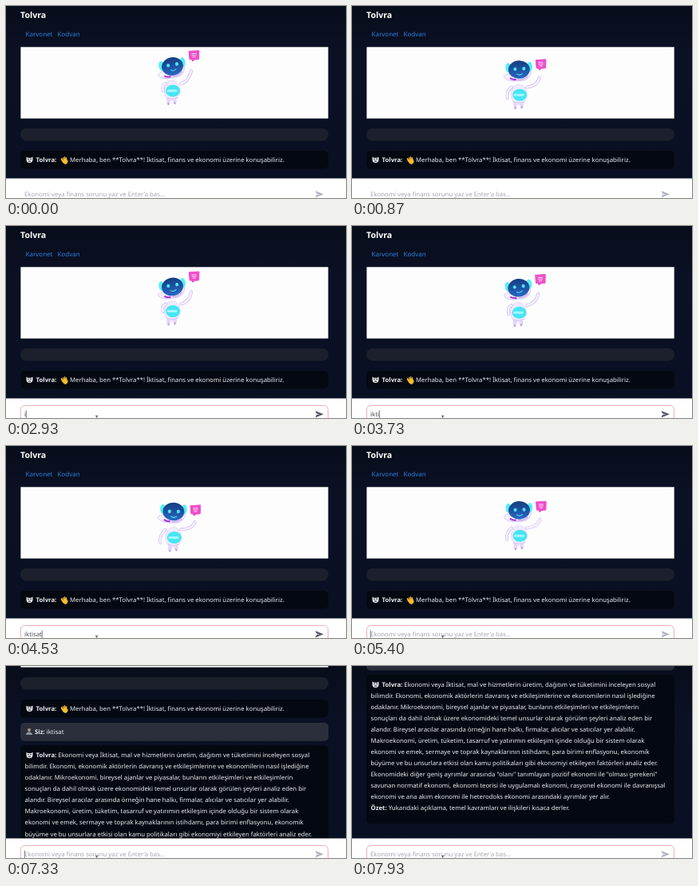
An HTML page that plays this animation: 426x240 px, repeating every 8 s.

```html
<!DOCTYPE html>
<html lang="tr">
<head>
<meta charset="utf-8">
<title>Tolvra</title>
<style>
  html, body { margin: 0; height: 100%; overflow: hidden; background: #0a1022; }
  svg { display: block; width: 100vw; height: 100vh; }
  text { font-family: "Noto Sans", "Open Sans", sans-serif; font-size: 7.78px; font-weight: 500; fill: #eceef2; text-rendering: geometricPrecision; white-space: pre; }
  .bold { font-weight: 700; }
  .title { font-size: 10.6px; font-weight: 700; fill: #fff; }
  .link { font-size: 8px; fill: #2b7de0; }
  .input { font-size: 7.8px; font-weight: 400; }
  .bubble { fill: #040911; }
</style>
</head>
<body>
<svg viewBox="0 0 426 240" preserveAspectRatio="none">
  <defs>
    <linearGradient id="sky" x2="0" y2="1">
      <stop offset="0" stop-color="#080d1b"/>
      <stop offset=".25" stop-color="#0b1124"/>
      <stop offset="1" stop-color="#0a1023"/>
    </linearGradient>
    <linearGradient id="visor" x2="0" y2="1">
      <stop offset="0" stop-color="#143d80"/>
      <stop offset="1" stop-color="#2868c4"/>
    </linearGradient>
    <g id="bot">
      <path d="M25.500 188.500l2 1.300h4l2-1.300v3.500q0 4-4 4t-4-4z" fill="#e4e7ea"/>
      <path d="M27.300 191.400h1.400m1.600 0h1.400M28 194h3" stroke="#161a22" stroke-width="1.1"/>
    </g>
  </defs>
  <rect width="426" height="240" fill="url(#sky)"/>

  <g id="page">
    <text class="title" x="18" y="14.500">Tolvra</text>
    <text class="link" x="24.500" y="38">Karvonet</text>
    <text class="link" x="64.500" y="38">Kodvan</text>
    <rect x="18.400" y="51.300" width="385.300" height="89.300" fill="#fdfdfe"/>

    <g id="body" stroke-linecap="round">
      <path d="M204.500 116v5m8-4v3" stroke="#e4d6f9" stroke-width="4.500"/>
      <path d="M204.500 122v1m8-2v1" stroke="#c09bf0" stroke-width="2"/>
      <ellipse cx="209" cy="105.500" rx="10" ry="12.500" fill="#f1eafc" stroke="#ddcff5" stroke-width=".7"/>
      <ellipse cx="210" cy="106" rx="9" ry="7.500" fill="#45e6f4"/>
      <path d="M204 106h10" stroke="#a5f7fb" stroke-width="3"/>
      <path d="M202 114.500q7 3 14 0" stroke="#d3bdf5" fill="none"/>
    </g>
    <g fill="none" stroke-linecap="round" stroke-linejoin="round">
      <path class="arm" stroke="#cdb6f3" stroke-width="3.800"/>
      <path class="arm" stroke="#f7f1ff" stroke-width="2.500"/>
    </g>
    <g id="sign">
      <path d="M-6.300-5.500L6.300-6.300 6 4.500 1 5-2 7-2.500 5-5.500 4.500z" fill="#ee4fc9" stroke="#ee4fc9" stroke-linejoin="round"/>
      <path d="M-3-2.500h6M-3-.4h6M-2 1.700h4" stroke="#ffd7f5"/>
    </g>
    <g id="head">
      <path d="M-13 4q-8 2-6 5 4 5 13 5h11q10-2 10-14z" fill="#f5efff" stroke="#d3c0f4" stroke-width=".8"/>
      <ellipse cx="-13.500" cy="-3" rx="3.300" ry="6" fill="#55eff6"/>
      <ellipse cx="13.500" cy="-3" rx="3.300" ry="6" fill="#55eff6"/>
      <ellipse rx="13.500" ry="11.300" fill="url(#visor)"/>
      <g id="face" stroke="#4deaf7" fill="none" stroke-linecap="round">
        <ellipse cx="-5" cy="-2" rx="1.500" ry="1.700" fill="#4deaf7"/>
        <ellipse cx="6" cy="-2" rx="1.500" ry="1.700" fill="#4deaf7"/>
        <path d="M-3 4q3 3 7 0"/>
      </g>
      <path d="M-12 10q4 3 8 2" fill="none" stroke="#b13be0" stroke-width="2.200"/>
      <path d="M-2 12.500q8 1 13-4" fill="none" stroke="#c9a6f5" stroke-width="1.400"/>
    </g>

    <rect x="18" y="153" width="386" height="15.500" rx="7.700" fill="#1c202c"/>
    <rect class="bubble" x="18" y="181" width="386" height="22.500" rx="5"/>
    <use href="#bot"/>
    <text class="bold" x="37.500" y="195">Tolvra:</text>
    <path d="M69.500 190l3 3-1-4 2 3v-4l1.300 4 .7-3 .9 4 1 .5q-.5 4-3 4-2.500 0-5.200-5.500z" fill="#f6bd2c" stroke="#f6bd2c" stroke-width=".7"/>
    <text x="80" y="195">Merhaba, ben **Tolvra**! İktisat, finans ve ekonomi üzerine konuşabiliriz.</text>

    <g id="answer">
      <rect x="18" y="210" width="386" height="22.700" rx="5" fill="#2b2f3b"/>
      <circle cx="29" cy="219" r="2" fill="#a89a90"/>
      <path d="M25 225q0-3.500 4-3.500t4 3.500z" fill="#8d929c"/>
      <text x="36" y="224.200"><tspan class="bold">Siz:</tspan> iktisat</text>
      <rect class="bubble" x="18" y="238.300" width="386" height="186.500" rx="5"/>
      <use href="#bot" y="58.300"/>
    </g>
  </g>

  <rect y="215.500" width="426" height="25" fill="#fff"/>
  <rect id="focus" x="18.500" y="224.500" width="385" height="24" rx="5" fill="#fff" stroke="#eeb0b6"/>
  <text class="input" id="entry" x="23" y="238"></text>
  <path id="caret" d="M0 230.500v9.500" stroke="#555866" stroke-width=".8"/>
  <path id="send" d="M387.500 231l10.500 4.300-10.500 4.300 1.500-3.600 4-.7-4-.7z"/>
  <path id="pointer" d="M112 237.500h3.400m-1.700 0v4" fill="none" stroke="#333" stroke-width=".8"/>
</svg>
<script>
const LOOP = 8000, FOCUS = 2300, TYPE = 2850, KEY = 230, ENTER = 5200, REPLY = 6986, SCROLL = 600;
const SCROLL_HEIGHT = 227.3;
const WORD = "iktisat";
const PLACEHOLDER = "Ekonomi veya finans sorunu yaz ve Enter’a bas…";
const LINES = [
  "Ekonomi veya İktisat, mal ve hizmetlerin üretim, dağıtım ve tüketimini inceleyen sosyal",
  "bilimdir. Ekonomi, ekonomik aktörlerin davranış ve etkileşimlerine ve ekonomilerin nasıl işlediğine",
  "odaklanır. Mikroekonomi, bireysel ajanlar ve piyasalar, bunların etkileşimleri ve etkileşimlerin",
  "sonuçları da dahil olmak üzere ekonomideki temel unsurlar olarak görülen şeyleri analiz eden bir",
  "alandır. Bireysel aracılar arasında örneğin hane halkı, firmalar, alıcılar ve satıcılar yer alabilir.",
  "Makroekonomi, üretim, tüketim, tasarruf ve yatırımın etkileşim içinde olduğu bir sistem olarak",
  "ekonomi ve emek, sermaye ve toprak kaynaklarının istihdamı, para birimi enflasyonu, ekonomik",
  "büyüme ve bu unsurlara etkisi olan kamu politikaları gibi ekonomiyi etkileyen faktörleri analiz eder.",
  "Ekonomideki diğer geniş ayrımlar arasında \"olanı\" tanımlayan pozitif ekonomi ile \"olması gerekeni\"",
  "savunan normatif ekonomi, ekonomi teorisi ile uygulamalı ekonomi, rasyonel ekonomi ile davranışsal",
  "ekonomi ve ana akım ekonomi ile heterodoks ekonomi arasındaki ayrımlar yer alır.",
  "Yukarıdaki açıklama, temel kavramları ve ilişkileri kısaca derler."
];
const LABELS = { 0: "Tolvra: ", 11: "Özet: " };

const $ = id => document.getElementById(id);
const set = (id, name, value) => $(id).setAttribute(name, value);
const show = (id, on) => $(id).style.display = on ? "" : "none";
const lerp = (a, b, p) => a + (b - a) * p;
const clamp = x => Math.max(0, Math.min(1, x));
const smooth = x => x * x * (3 - 2 * x);

$("answer").insertAdjacentHTML("beforeend", LINES.map((line, i) =>
  `<text x="${i ? 23.5 : 37.5}" y="${253.2 + 14.05 * i}"><tspan class="bold">${LABELS[i] || ""}</tspan>${line}</text>`).join(""));

function drawRobot(t) {
  const p = (1 - Math.cos(t / 3200 * 2 * Math.PI)) / 2;
  const mix = (a, b) => lerp(a, b, p);
  set("body", "transform", `translate(${mix(-1, 1)} ${mix(0, 9)})`);
  set("head", "transform", `translate(${mix(208.5, 210)} ${mix(75.5, 82.5)}) rotate(${mix(-10, 2)})`);
  set("face", "transform", `translate(0 ${mix(0, 2)})`);
  set("sign", "transform", `translate(${mix(235.5, 237.5)} ${mix(62, 81.5)})`);
  const arms = `M219 ${mix(97, 105)}Q${mix(229, 235)} ${mix(95, 104)} ${mix(232, 237)} ${mix(81, 96)}`
    + `M200 ${mix(97, 105)}Q${mix(195, 192)} ${mix(99, 111)} ${mix(197, 193)} ${mix(106, 122)}`;
  document.querySelectorAll(".arm").forEach(arm => arm.setAttribute("d", arms));
}

function drawInput(t) {
  const count = t < ENTER ? Math.max(0, Math.min(WORD.length, Math.floor((t - TYPE) / KEY) + 1)) : 0;
  const entry = $("entry");
  entry.textContent = count ? WORD.slice(0, count) : PLACEHOLDER;
  entry.style.fill = count ? "#4b4e5b" : "#a5a7b2";
  show("focus", t >= FOCUS);
  show("pointer", t >= FOCUS);
  set("send", "fill", count ? "#555967" : "#b0b3c0");
  const typing = count && t < TYPE + KEY * WORD.length + 500;
  const start = t < ENTER ? FOCUS : ENTER;
  show("caret", t >= FOCUS && (typing || (t - start) % 1000 < 500));
  set("caret", "transform", `translate(${23.3 + (count ? entry.getComputedTextLength() : 0)} 0)`);
}

function draw(now) {
  const t = now % LOOP;
  drawRobot(t);
  drawInput(t);
  show("answer", t >= REPLY);
  set("page", "transform", `translate(0 ${-SCROLL_HEIGHT * smooth(clamp((t - REPLY) / SCROLL))})`);
  requestAnimationFrame(draw);
}
draw(0);
</script>
</body>
</html>
```
